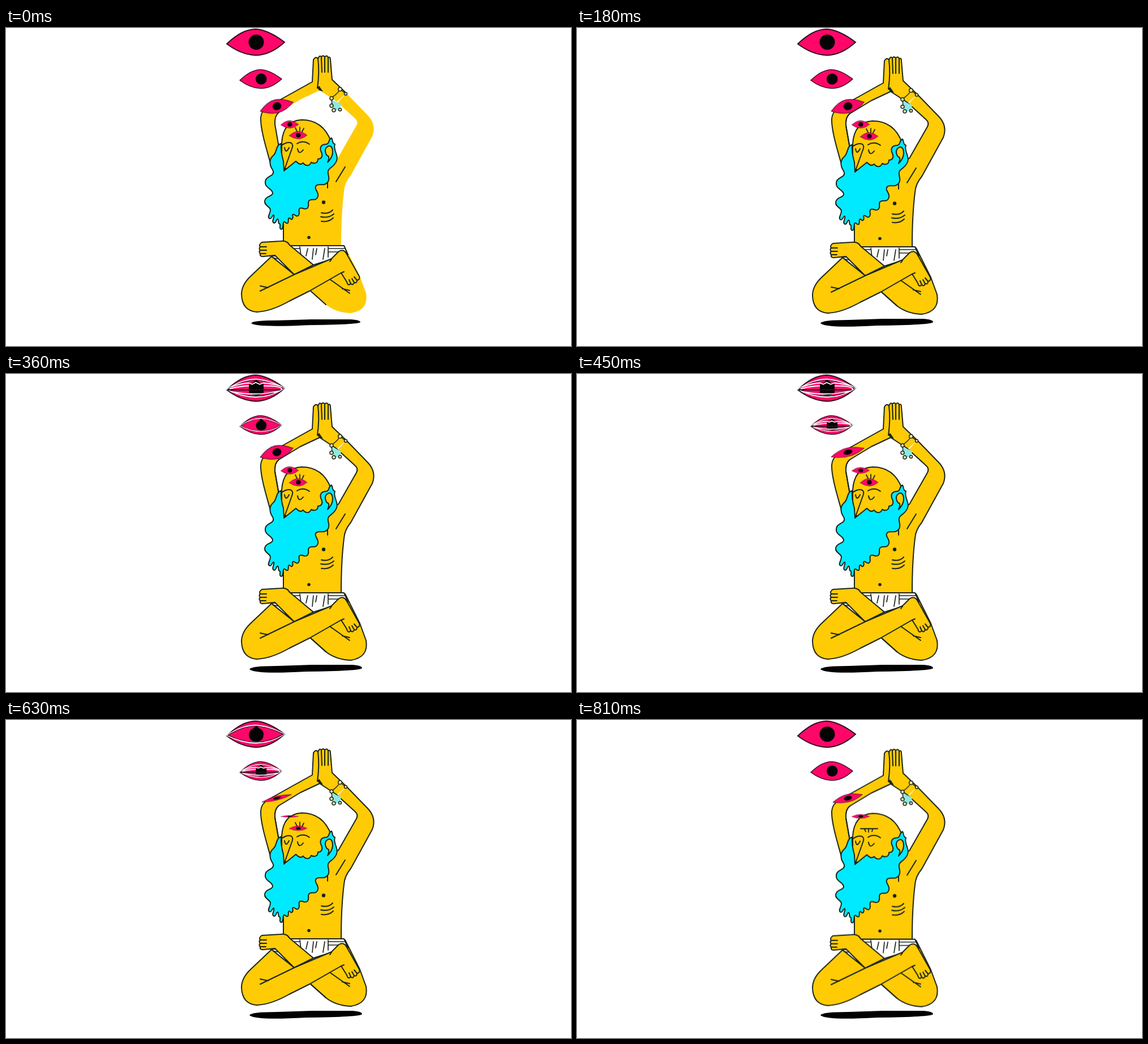
Write an HTML page without scripts that moves like this. It is 998 px wide and 561 px high and loops after 0.9 s.

```html
<!DOCTYPE html>
<html lang="en">
<head>
<meta charset="utf-8">
<title>Meditation</title>
<style>
  html, body { margin: 0; width: 100%; height: 100%; overflow: hidden; background: #fff; }
  svg { display: block; width: 100vw; height: 100vh; }

  .ink { stroke: #1b241c; stroke-width: 2; stroke-linejoin: round; stroke-linecap: round; fill: none; }
  .skin { fill: #ffcb05; }
  .hair { fill: #00eaff; }
  .white { fill: #fff; }
  .dot { fill: #1b241c; stroke: none; }
  .pupil { fill: #050305; stroke: none; }
  .lid { fill: #ff0769; stroke: #2a0d1c; stroke-width: 1.8; vector-effect: non-scaling-stroke; }
  .halo { fill: none; stroke: #fff; stroke-width: 4.5; vector-effect: non-scaling-stroke; }
  .glint { fill: none; stroke: #fff; stroke-width: 1.8; vector-effect: non-scaling-stroke; }

  .man, .edge, .shadow, .half, .shut, .blink, .lashes, .closed, .trace {
    animation: 900ms step-end infinite;
  }
  .man { animation-name: bob; }
  .edge { animation-name: edge; }
  .shadow { animation-name: shadow; transform-origin: 530px 520px; }
  .half { animation-name: half; }
  .shut { animation-name: shut; }
  .late .half, .late .shut { animation-delay: -810ms; }
  .arm { animation-name: arm; }
  .crown { animation-name: crown; }
  .brow { animation-name: brow; }
  .lashes { animation-name: lashes; }
  .closed { animation-name: closed; }
  .trace { animation-name: trace; }

  @keyframes bob {
    0% { transform: translateY(-2px); }
    10% { transform: translateY(-1px); }
    20% { transform: none; }
    30% { transform: translateY(-1.6px); }
    40% { transform: none; }
    90%, 100% { transform: translateY(.7px); }
  }
  @keyframes edge { 0% { stroke-opacity: 0; } 10%, 100% { stroke-opacity: 1; } }
  @keyframes shadow { 0% { transform: scale(.97, .85); } 10%, 100% { transform: none; } }
  @keyframes half { 0% { opacity: 0; } 30% { opacity: 1; } 80%, 100% { opacity: 0; } }
  @keyframes shut { 0% { opacity: 0; } 40% { opacity: 1; } 70%, 100% { opacity: 0; } }
  @keyframes arm {
    0% { transform: none; }
    50% { transform: scaleY(.65); }
    60% { transform: scale(.9, .3); }
    80% { transform: scale(.9, .32); }
    90%, 100% { transform: scale(.9, .58); }
  }
  @keyframes crown {
    0% { transform: none; }
    50% { transform: scaleY(.8); }
    60% { transform: scaleY(.55); }
    70% { transform: scaleY(.25); }
    80% { transform: scale(0); }
    90%, 100% { transform: scaleY(.55); }
  }
  @keyframes brow {
    0% { transform: none; }
    70% { transform: scaleY(.65); }
    80% { transform: scaleY(.3); }
    90%, 100% { transform: scale(0); }
  }
  @keyframes lashes {
    0% { transform: none; }
    70% { transform: translateY(3px); }
    80% { transform: translateY(7px); }
    90%, 100% { opacity: 0; }
  }
  @keyframes closed { 0% { opacity: 0; } 90%, 100% { opacity: 1; } }
  @keyframes trace { 0% { opacity: 0; } 80% { opacity: 1; } 90%, 100% { opacity: 0; } }
</style>
</head>
<body>
<svg viewBox="0 0 998 561" preserveAspectRatio="none">
  <defs>
    <path id="lens" d="M-51 3Q-24-23 0-23Q22-22 51 0Q26 23 0 23Q-26 22-51 3Z"/>
    <g id="eye">
      <use href="#lens" class="lid"/>
      <circle class="pupil" cx="1" r="13.500"/>
    </g>
    <g id="inner">
      <use href="#lens" class="halo" transform="scale(.96 .66)"/>
      <use href="#lens" class="lid" transform="scale(.96 .62)"/>
      <path class="pupil" d="M-12 0Q-11-7-5-10L1-15L7-10Q14-7 14 0Q14 13 1 13Q-12 13-12 0Z"/>
    </g>
    <g id="stripes">
      <path class="pupil" d="M-12-9H14V9H-12Z"/>
      <path class="glint" d="M-44-2Q-25-9-12-9L-6-7L0-10L7-7L14-9Q32-8 46-3M-44 6Q0 15 40 5M-46 1Q-25-4-12-4M14-4Q44-4 46 1Q44 6 34 7"/>
      <path class="lid" d="M-50 3H44"/>
    </g>
  </defs>

  <path class="shadow" d="M430 521Q432 515 480 515L540 513H610Q629 514 629 519Q625 524 530 525Q440 530 430 521Z"/>

  <g class="man ink">
    <!-- arms and torso -->
    <path class="skin" d="M467 240C460 215 449 180 450 160Q451 148 462 141L505 117L541 97L543 58Q547 51 551 56Q554 49 557 53Q560 49 563 53Q567 49 569 54Q573 52 573 58L576 93L601 117"/>
    <path class="skin edge" d="M601 117L638 155Q655 172 647 193L609 262Q598 275 597 290Q592 330 592 386H490V240"/>
    <path d="M490 378V340M490 386H592"/>
    <path class="white edge" d="M482 212L475 172Q474 157 482 151L520 128L554 112L583 131L616 161Q623 167 619 174L587 230L560 236Z"/>
    <path d="M482 212L475 172Q474 157 482 151"/>
    <path d="M551 56Q554 80 550 108M557 54L558 80M563 54V80M569 55V80"/>
    <path class="dot" d="M550 107L553 104L560 114L553 112Z"/>
    <path d="M599 247L583 273M568 272V284M557 328Q570 331 577 323M556 335Q570 338 579 330M557 343Q570 345 578 337"/>
    <circle class="dot" cx="561" cy="309.500" r="3.200"/>
    <circle class="dot" cx="535" cy="371.500" r="2.800"/>

    <!-- bracelet -->
    <path d="M574 128L576 140L579 148L590 146L592 136Z" fill="#8ee8e4" stroke="none"/>
    <path d="M590 110Q586 118 575 125L576 139M590 110L600 118" stroke-width="1.5"/>
    <g fill="#f6ecae" stroke-width="1.500">
      <circle cx="590" cy="110" r="3.300"/>
      <circle cx="600" cy="118" r="2.500"/>
      <circle cx="575" cy="126" r="3"/>
      <circle cx="575" cy="139" r="3"/>
      <circle cx="579" cy="147" r="3"/>
      <circle cx="590" cy="146" r="2.500"/>
    </g>

    <!-- head -->
    <path class="skin" d="M487 250V205Q489 166 522 164Q560 164 574 202L560 250Z"/>
    <path class="hair" d="M486 206C476 208 479 222 472 227C465 233 466 240 467 244C468 250 476 255 470 261C465 265 457 266 458 276C459 285 470 285 471 293C471 300 459 297 457 307C456 316 467 317 467 323C467 329 461 335 465 338C470 340 470 331 473 332C475 335 468 344 473 346C478 347 477 338 480 339C483 342 479 347 484 348C485 351 482 356 486 357C490 357 489 350 490 345C493 341 494 349 498 346C500 342 497 337 501 337C505 343 508 337 506 332C508 327 513 338 517 332C520 328 515 323 519 320C523 317 528 325 533 319C537 313 531 310 536 306C541 303 548 308 551 299C553 291 543 286 548 280C553 275 562 283 569 273C573 265 567 260 569 254C571 248 580 247 584 236C588 225 577 218 581 207C575 205 578 200 575 196C568 199 573 205 566 207C557 207 554 212 556 219C560 226 559 233 551 233C551 242 543 241 539 239C536 247 528 245 525 240C520 245 515 240 512 237L491 254L490 237Q485 220 486 206Z"/>
    <path class="skin" d="M565 214Q572 206 576 214Q580 227 568 239Q573 228 567 227Q562 220 565 214Z"/>
    <path d="M487 209Q497 202 504 205Q508 208 505 215L491 254M492 213Q494 225 500 213M515 215Q517 227 525 217M514 206Q525 199 536 207"/>

    <!-- third eye -->
    <path class="lashes" d="M511 178L514 184M519 177V184M526 179L523 185" stroke-width="1.700"/>
    <path class="closed" d="M501 191H531M508 192L510 196M515 192V197M522 192L521 196" stroke-width="1.800"/>
    <g transform="translate(516 191) scale(.31 .29)"><use href="#eye" class="blink brow"/></g>

    <!-- shorts and far leg -->
    <path class="skin edge" d="M599 388L625 440L636 470Q641 500 609 505Q583 504 565 490L537 465L560 400Z"/>
    <path class="white" d="M490 386H597L604 402L588 397L575 410L543 420ZM468 404H480L500 430Z"/>
    <path d="M519 388L521 404M533 391L530 404M543 391L541 410M549 391L547 402M563 391L560 410M569 388V406M569 391H599M569 397H602M507 391H519M470 407L479 409" stroke-width="1.700"/>
    <path class="skin" d="M543 420L501 385Q496 376 485 378L452 380Q446 384 449 388Q446 391 449 394Q446 397 449 400Q448 406 455 405L475 403L509 437Z"/>
    <path d="M449 388H460M449 394H460M449 400H459M497 380L501 385"/>
    <path d="M537 465L565 490M573 446L607 470M594 462L607 465"/>

    <!-- near leg -->
    <path class="skin" d="M469 405L509 437L575 409L588 396Q597 391 602 401L624 440Q626 446 620 447Q620 453 615 451Q613 457 609 453Q604 458 602 450L592 434L536 466L500 484Q468 502 443 503Q417 501 416 472Q416 455 432 440Z"/>
    <path d="M509 437L449 466M449 457L463 460M575 410L572 414M592 434L597 432M606 446L609 453M611 444L615 451M615 441L620 447"/>
  </g>

  <!-- floating eyes -->
  <g transform="translate(441 25)">
    <use href="#eye"/>
    <use href="#inner" class="half"/>
    <use href="#stripes" class="shut"/>
  </g>
  <g class="late" transform="translate(450 90) scale(.725)">
    <use href="#eye"/>
    <use href="#inner" class="half"/>
    <use href="#stripes" class="shut"/>
  </g>
  <g transform="translate(478 138) rotate(-14) scale(.59 .51)"><use href="#eye" class="blink arm"/></g>
  <g transform="translate(501 170) scale(.31 .29)"><use href="#eye" class="blink crown"/></g>
  <path class="trace" d="M487 170L497 167L505 168L519 167M493 166L503 163" fill="none" stroke="#3c8f92" stroke-width="1.300"/>
</svg>
</body>
</html>
```
